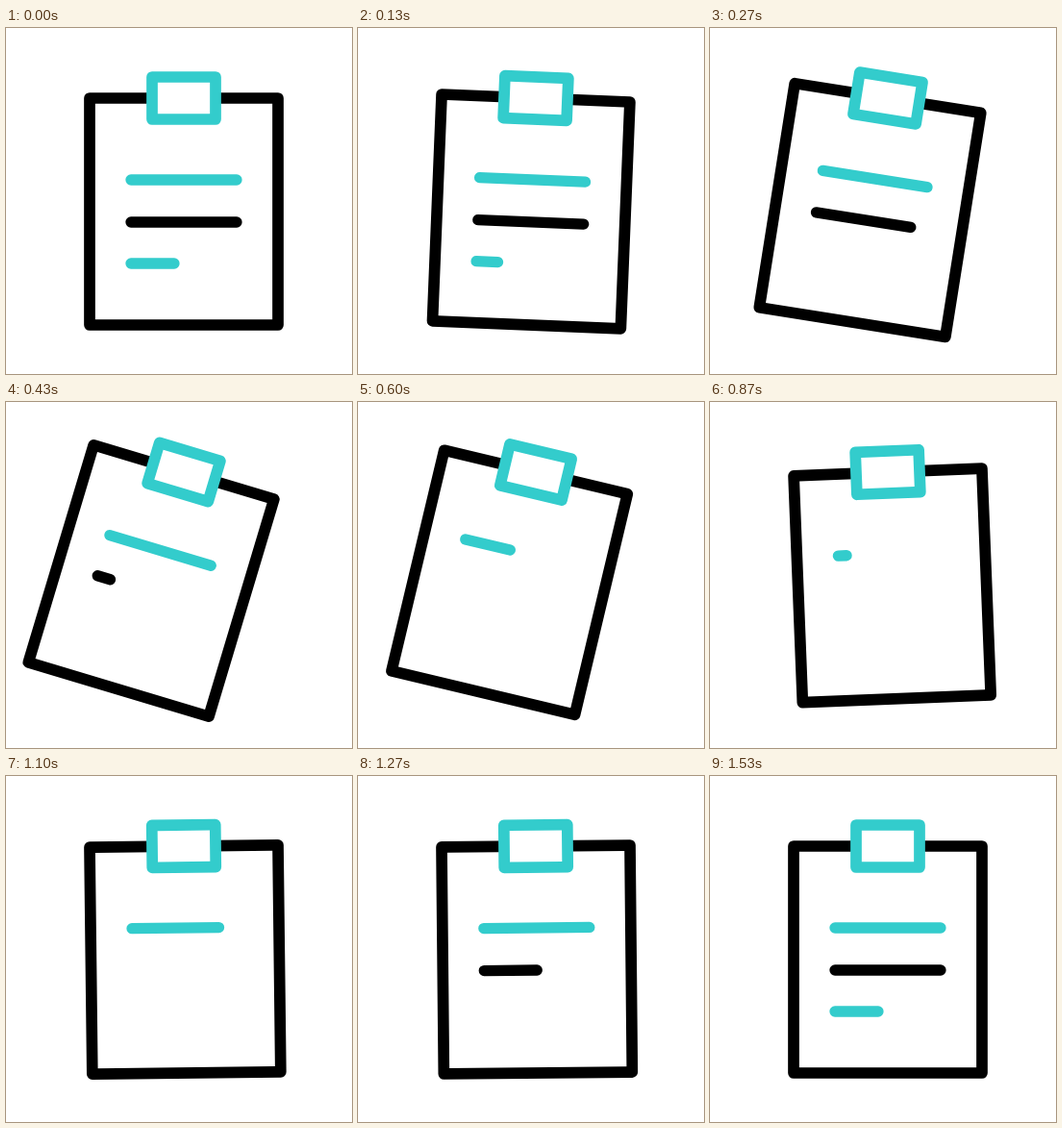
Animation, 360 px wide and 360 px high, one loop 2 s. Source, as an HTML page:

```html
<!DOCTYPE html>
<html lang="en">
<head>
<meta charset="utf-8">
<title>Clipboard</title>
<style>
  html, body { margin: 0; width: 100%; height: 100%; overflow: hidden; background: #fff; }
  svg { display: block; width: 100vw; height: 100vh; }
  #board { fill: none; stroke: #000; stroke-width: 11.7; stroke-linecap: round; stroke-linejoin: round; }
  #board path { stroke-width: 11.3; }
  #board .teal { stroke: #33cccc; }
  #board .clip { fill: #fff; }
</style>
</head>
<body>
<svg viewBox="0 0 360 360">
  <g id="board">
    <rect x="87" y="73" width="196" height="236"/>
    <rect class="teal clip" x="152" y="51" width="66" height="44"/>
    <path class="teal"/>
    <path/>
    <path class="teal"/>
  </g>
</svg>
<script>
const FPS = 30, FRAMES = 60, LEFT = 130;
const board = document.getElementById('board');
const paths = board.querySelectorAll('path');

// Each line is wiped away, then drawn again; spans in frames
const lines = [
  { y: 158, len: 110, out: [13, 22.3], back: [23.3, 37] },
  { y: 202, len: 110, out: [6, 15.3], back: [33, 43] },
  { y: 245, len: 45, out: [0, 8], back: [39, 46] }
];

// cubic-bezier(.42, 0, .58, 1), solved by bisection
function easeInOut(x) {
  if (x <= 0) return 0;
  if (x >= 1) return 1;
  let lo = 0, hi = 1, s;
  for (let i = 0; i < 24; i++) {
    s = (lo + hi) / 2;
    const bx = 3 * (1 - s) * s * (0.42 * (1 - s) + 0.58 * s) + s ** 3;
    if (bx < x) lo = s; else hi = s;
  }
  return s * s * (3 - 2 * s);
}

const progress = (f, [from, to]) => easeInOut((f - from) / (to - from));

// Each swing goes to the other side, half as far, and the last one comes to rest
function swing(f) {
  const spans = [16, 7, 6, 6, 6, 5];
  let start = 0, angle = 0;
  spans.forEach((span, i) => {
    const next = i < spans.length - 1 ? 18 * (-0.5) ** i : 0;
    angle += (next - angle) * progress(f, [start, start + span]);
    start += span;
  });
  return angle;
}

function draw() {
  // Frame times are rounded to 10 ms, so allow a few ms of lead
  const f = Math.floor((performance.now() + 3.4) * FPS / 1000) % FRAMES;
  board.setAttribute('transform', `rotate(${swing(f)} 185 73)`);
  lines.forEach(({ y, len, out, back }, i) => {
    const share = 1 - progress(f, out) + progress(f, back);
    paths[i].setAttribute('d', share > 0 ? `M${LEFT} ${y}h${share * len}` : '');
  });
  requestAnimationFrame(draw);
}
draw();
</script>
</body>
</html>
```
